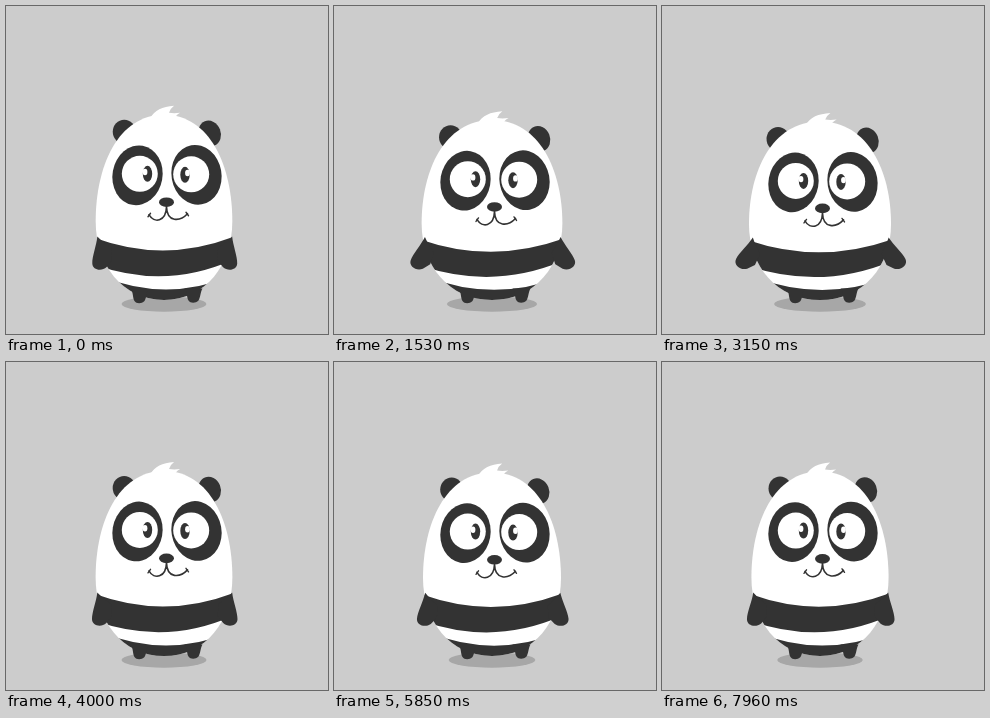
These frames come from a looping animation (322 by 328 pixels, 8 s). An HTML page:

```html
<!DOCTYPE html>
<html lang="en">
<head>
<meta charset="utf-8">
<title>Breathing panda</title>
<style>
  html, body { margin: 0; height: 100%; overflow: hidden; background: #ccc; }
  svg { display: block; width: 322px; height: 328px; }
</style>
</head>
<body>
<svg viewBox="0 0 322 328" fill="#333">
  <defs>
    <path id="egg" d="M158 108C112 108 90 160 90 215C90 258 116 294 158 294S226 258 226 215C226 160 204 108 158 108Z"/>
    <clipPath id="eggClip"><use href="#egg"/></clipPath>
    <path id="arm" d="M-2.500-5C-3 4-7 15-6.500 22C-6 28.500 3 30 8 25L13 18L12 6L2-1Z"/>
    <path id="foot" d="M-9-9H9C7-6 7 0 5 3C2 6-3 6-5 3C-7 0-6-6-9-9Z"/>
    <g id="pupil">
      <ellipse rx="4.700" ry="8"/>
      <ellipse cx="-2.500" cy="-1.800" rx="2.400" ry="3.200" fill="#fff"/>
    </g>
  </defs>

  <ellipse id="shadow" cx="158" cy="298" ry="7.700" fill="#a7a7a7"/>
  <ellipse id="earL" rx="11.500" ry="12"/>
  <ellipse id="earR" rx="11" ry="13"/>

  <g class="body" fill="#fff">
    <use href="#egg"/>
    <path d="M144 112C149 103 156 100 168 99Q164 102 163 106Q168 107 174 106Q169 109 167 114Z"/>
  </g>

  <g id="eyes">
    <ellipse cx="131.500" cy="168.500" rx="25" ry="30" transform="rotate(10 131.500 168.500)"/>
    <ellipse cx="190.500" cy="168" rx="25" ry="30" transform="rotate(-10 190.500 168)"/>
    <g fill="#fff">
      <circle cx="133.800" cy="167" r="18"/>
      <circle cx="185.200" cy="167.500" r="18"/>
    </g>
    <use href="#pupil" x="141.500" y="167"/>
    <use href="#pupil" transform="translate(179 168) scale(-1 1)"/>
  </g>

  <g id="cheeks" fill="#fff">
    <ellipse cx="134" cy="202" rx="25" ry="19.500" transform="rotate(-12 134 202)"/>
    <ellipse cx="187" cy="202" rx="25" ry="19.500" transform="rotate(12 187 202)"/>
  </g>

  <g class="body">
    <g clip-path="url(#eggClip)">
      <path d="M80 228Q158 261 236 227V249Q160 288 80 255Z"/>
      <path d="M95 270Q160 297 225 270V300H95Z"/>
    </g>
  </g>
  <use href="#foot" x="133.500" y="292"/>
  <use href="#foot" x="187.500" y="291.500"/>
  <use id="armL" href="#arm"/>
  <use id="armR" href="#arm"/>

  <g id="muzzle">
    <g stroke="#333" stroke-linecap="round" stroke-linejoin="round">
      <path id="lips" stroke-width="1.600"/>
      <path id="tickL" d="M-1 2L1.500-1.500" stroke-width="1.400"/>
      <path id="tickR" d="M-1.500-1.500L1 2" stroke-width="1.400"/>
    </g>
    <ellipse id="nose" cx="160.500" cy="195.500" rx="7.500" ry="4.800"/>
  </g>
</svg>
<script>
const LOOP = 8000, BREATH = 2010, TALLEST = 210;
const SMILE_ON = 6300, SMILE_OFF = 7250, SMILE_EASE = 220;

// Left end, four curves: out along the lower lip, back along the upper lip
const calm = [143, 208, 148, 217, 160, 215, 160.5, 200, 161, 216, 174, 215, 181.5, 207,
              174, 215, 161, 216, 160.5, 200, 160, 215, 148, 217, 143, 208];
const grin = [134, 191, 142, 202, 152, 203, 160.5, 203, 169, 203, 179, 202, 187, 191,
              178, 199, 166, 200, 160.5, 195, 155, 200, 143, 199, 134, 191];

const $ = id => document.getElementById(id);
const bodies = document.querySelectorAll('.body');
const mix = (a, b, k) => a + (b - a) * k;
const smooth = x => { x = Math.min(1, Math.max(0, x)); return x * x * (3 - 2 * x); };
const place = (id, x, y, extra = '') => $(id).setAttribute('transform', `translate(${x} ${y}) ${extra}`);

function draw(t) {
  const squash = (1 - Math.cos((t - TALLEST) / BREATH * 2 * Math.PI)) / 2;
  const smile = smooth((t - SMILE_ON) / SMILE_EASE) - smooth((t - SMILE_OFF) / SMILE_EASE);

  for (const body of bodies) {
    body.setAttribute('transform',
      `translate(158 294) scale(${1 + .045 * squash} ${1 - .041 * squash}) translate(-158 -294)`);
  }
  $('shadow').setAttribute('rx', 42 + 4 * squash);

  place('earL', 118.5 - 2.5 * squash, 125 + 8 * squash);
  place('earR', 203.5 + 2 * squash, 126.5 + 8 * squash, 'rotate(-22)');
  place('eyes', 0, 8 * squash);
  place('cheeks', 0, 8 * squash + 22 * (1 - smile));

  const swing = 31 * squash - 1;
  place('armL', 94 - 3.5 * squash, 235.5 + 1.5 * squash, `rotate(${swing})`);
  place('armR', 223.5 + 3.5 * squash, 235.5 + 1.5 * squash, `scale(-1 1) rotate(${swing})`);

  place('muzzle', 0, 7 * squash);
  place('nose', 0, -9 * smile);
  const p = calm.map((n, i) => mix(n, grin[i], smile));
  $('lips').setAttribute('d', `M${p.slice(0, 2)}C${p.slice(2)}Z`);
  place('tickL', p[0], p[1]);
  place('tickR', p[12], p[13]);
}

function tick() {
  draw(performance.now() % LOOP);
  requestAnimationFrame(tick);
}
tick();
</script>
</body>
</html>
```
